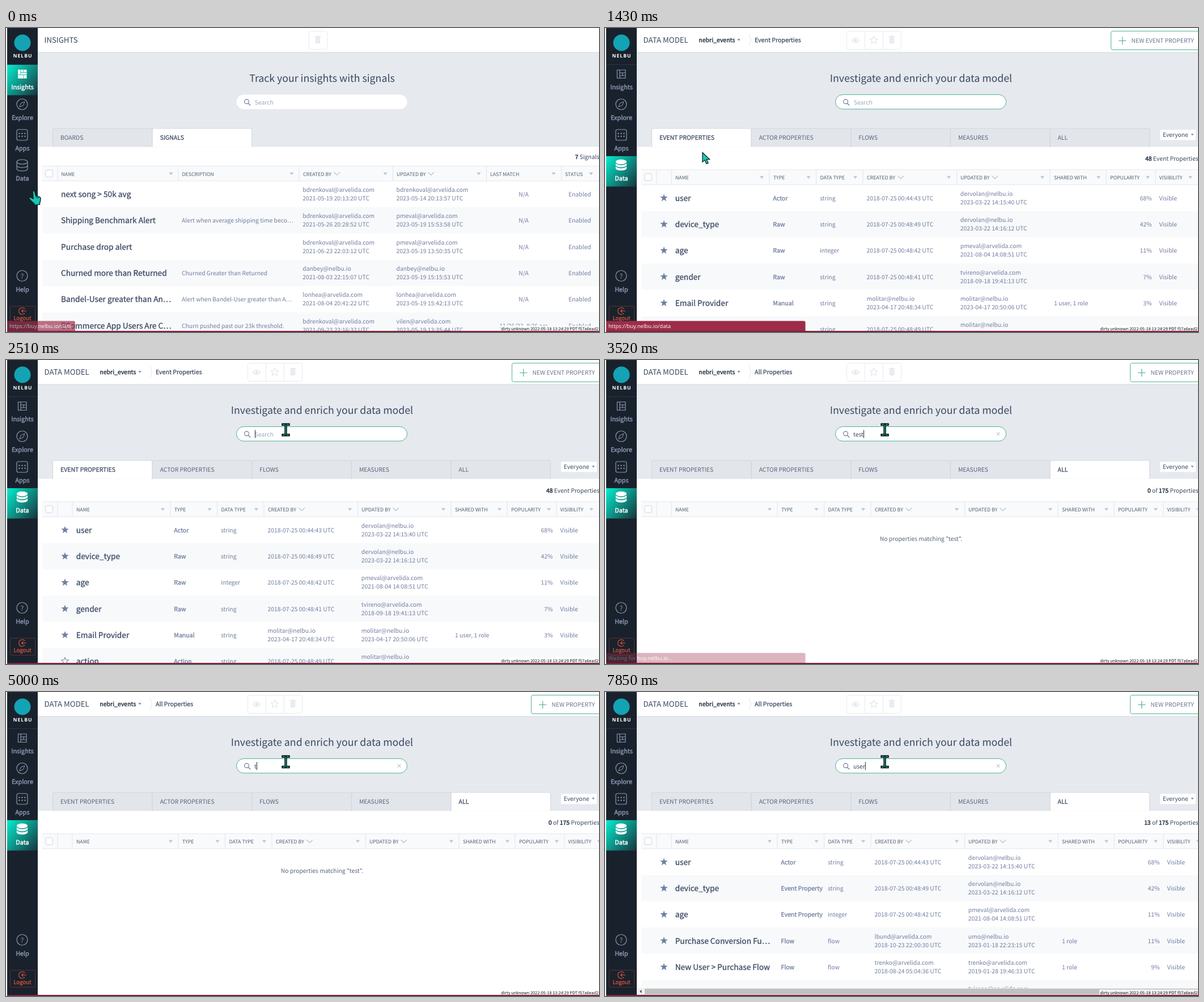
An HTML page that plays this animation: 1046x536 px, repeating every 8 s.

```html
<!DOCTYPE html>
<html lang="en">
<head>
<meta charset="utf-8">
<title>Data model search</title>
<style>
  html, body { margin: 0; width: 100%; height: 100%; overflow: hidden; background: #fff; }
  svg { display: block; width: 1046px; height: 536px; }
  text { font-family: "Noto Sans CJK JP", "Noto Sans CJK SC", "Noto Sans CJK", "Open Sans", sans-serif; white-space: pre; text-rendering: geometricPrecision; }
  .plain { font-family: "Open Sans", "Noto Sans", sans-serif; }
</style>
</head>
<body>
<svg id="stage" viewBox="0 0 1046 536" xmlns="http://www.w3.org/2000/svg"></svg>
<script>
const LOOP = 8000, BODY = 11.55, ROW = 46.3;
const INK = '#3a4862', DARK = '#212d40', SLATE = '#707d9f', NAVY = '#19222c', GREEN = '#4fb096', MUTED = '#8996b1';
const CORP = '@arvelida.com', IO = '@nelbu.io';

// ---- drawing helpers ----
const rect = (x, y, w, h, fill, extra = '') => `<rect x="${x}" y="${y}" width="${w}" height="${h}" fill="${fill}" ${extra}/>`;
const line = (d, color, w = 1, fill = 'none') => `<path d="${d}" fill="${fill}" stroke="${color}" stroke-width="${w}"/>`;
const fillPath = (d, color) => `<path d="${d}" fill="${color}"/>`;
const circle = (x, y, r, fill, extra = '') => `<circle cx="${x}" cy="${y}" r="${r}" fill="${fill}" ${extra}/>`;
// Sizes follow a narrower cut of the same letterforms, hence the ratio.
const fontSize = size => (size / 1.117).toFixed(2);
function text(x, y, s, { size = BODY, fill = SLATE, heavy = 0, anchor = 'start' } = {}) {
  const stroke = heavy ? `stroke="${fill}" stroke-width="${heavy}"` : '';
  return `<text x="${x}" y="${y}" font-size="${fontSize(size)}" fill="${fill}" text-anchor="${anchor}" ${stroke}>${s}</text>`;
}
const group = (id, content) => `<g id="${id}">${content}</g>`;
const caretDown = (x, y, w, color) => fillPath(`M${x - w} ${y - w * .65}h${2 * w}l${-w} ${w * 1.3}z`, color);

function star(x, y, r, filled, color) {
  const points = Array.from({ length: 10 }, (_, i) => {
    const a = -Math.PI / 2 + i * Math.PI / 5, k = i % 2 ? r * .42 : r;
    return (x + k * Math.cos(a)).toFixed(1) + ',' + (y + k * Math.sin(a)).toFixed(1);
  });
  return `<polygon points="${points.join(' ')}" fill="${filled ? color : 'none'}" stroke="${color}" stroke-width="${filled ? 0 : 1}"/>`;
}

function trash(x) {
  return rect(x - 4, 17.5, 8, 9.5, '#e0e4eb', 'rx="1"') + rect(x - 5.5, 15, 11, 1.6, '#e0e4eb') +
    rect(x - 2, 13.6, 4, 1.5, '#e0e4eb') + line(`M${x - 1.5} 19v6.5m3-6.5v6.5`, '#fff');
}

// ---- sidebar ----
function navItem(top, label, lit, active) {
  const color = lit ? '#fff' : MUTED;
  return (active ? rect(2, top, 54, 53.5, 'url(#glow)') : '') +
    text(29, top + 43, label, { size: 12.1, fill: color, heavy: .45, anchor: 'middle' });
}
function insights(active) {
  return navItem(65, 'Insights', active, active) + (active
    ? rect(21, 73.5, 15.5, 15.5, '#fff') + line('M26 73.5v9m0-4h10.5M21 82.5h15.5M31 82.5v6.5M31 73.5v5', '#12b3a0', .9)
    : line('M21.5 74h14.5v14.5h-14.5zM26 74v14.5M26 79h10M26 84h10M31 79v5', MUTED, 1.2));
}
function data(lit, active) {
  const disc = y => `M19 ${y}c0 5.4 19 5.4 19 0`;
  return navItem(226, 'Data', lit, active) + (lit
    ? `<ellipse cx="28.5" cy="236" rx="9.7" ry="4.2" fill="#fff"/>` +
      [238.2, 243.8].map(y => fillPath(`M18.8 ${y}c2 4.6 17.4 4.6 19.4 0v3.6c-1 5-18.4 5-19.4 0z`, '#fff')).join('')
    : `<ellipse cx="28.5" cy="236" rx="9.5" ry="4" fill="none" stroke="${MUTED}" stroke-width="1.2"/>` +
      line(`M19 236v12M38 236v12${disc(242)}${disc(248)}`, MUTED, 1.2));
}
function sidebar() {
  const ring = `stroke="${MUTED}" stroke-width="1.2"`;
  const dots = [23.5, 28.5, 33.5].flatMap(x => [186, 191].map(y => circle(x, y, 1.2, MUTED))).join('');
  return rect(2, 0, 54, 536, NAVY) + circle(29, 26, 14.5, '#14a3b4') +
    `<text class="plain" x="29.5" y="51.5" font-size="8.6" font-weight="700" fill="#fff" text-anchor="middle" letter-spacing="1">NELBU</text>` +
    line('M2 64.5h54', '#2b3641') +
    navItem(119, 'Explore') + circle(28.5, 134.5, 9.5, 'none', ring) + line('M33 130l-2.6 6.6-6.6 2.6 2.6-6.6z', MUTED) +
    navItem(172.5, 'Apps') + rect(19, 179, 19, 19, 'none', 'rx="3" ' + ring) + dots +
    navItem(422, 'Help') + circle(28.5, 437, 9.5, 'none', ring) +
    text(28.5, 441.5, '?', { size: 13, fill: MUTED, anchor: 'middle' }) +
    rect(7.5, 490.5, 44, 30, 'none', 'rx="2" stroke="#5b2f35"') +
    line('M33.5 495.5a6 6 0 1 0 0 7M36 499h-8.5m3-2.8l-3 2.8 3 2.8', '#e0563f', 1.1) +
    text(29, 514.5, 'Logout', { size: 10.6, fill: '#e0563f', heavy: .25, anchor: 'middle' }) +
    group('insightsOn', insights(true)) + group('insightsOff', insights(false)) +
    group('dataOff', data(false, false)) + group('dataHover', data(true, false)) + group('dataOn', data(true, true));
}

// ---- page pieces ----
function tabs(labels, active) {
  return labels.map((label, i) => {
    const x = 82.5 + i * 175.65, on = i === active;
    return line(`M${x} 209.5v-29.5q0-3 3-3h169.6q3 0 3 3v29.5`, '#d0d5de', 1, on ? '#fff' : '#e2e5ea') +
      text(x + 13.5, 197.3, label, { size: on ? 11.75 : 11.5, fill: on ? INK : '#56637c', heavy: on ? .25 : 0 });
  }).join('');
}
const heading = s => text(557.5, 95.2, s, { size: 19.8, fill: INK, anchor: 'middle' });
const pageTitle = s => text(67.5, 26.2, s, { size: 14.8, fill: INK });

function tableHead(top, dividers, columns, filters) {
  return rect(64, top, 982, 26.5, '#f9fafb') + line(`M64 ${top}h982M64 ${top + 26.5}h982`, '#e4e8ee') +
    rect(70, top + 7, 12.5, 12.5, '#fff', 'rx="3" stroke="#cdd5e1"') +
    line(dividers.map(x => `M${x} ${top}v26.5`).join(''), '#e1e5ec') +
    columns.map(([x, label]) => text(x, top + 17.3, label, { size: 9.8, fill: '#505d77' }) +
      (/BY$/.test(label) ? line(`M${x + (label[0] === 'C' ? 54.5 : 55.5)} ${top + 11}l5.2 5 5.2-5`, '#8a96ad') : '')).join('') +
    filters.map(x => caretDown(x, top + 13.7, 3.6, '#bcc4d2')).join('');
}
const band = (top, i) => i % 2 ? rect(64, top + i * ROW, 982, ROW, '#f8f9fb') : '';
const who = (x, y, [user, date]) => user ? text(x, y - 4, user) + text(x, y + 11, date + ' UTC') : text(x, y + 4, date + ' UTC');
const nameCell = (x, y, s) => text(x, y + 5, s, { size: 15.3, fill: INK, heavy: .3 });

function signalsPage() {
  const lead = 'bdrenkoval' + CORP, second = 'pmeval' + CORP, NA = 'N/A';
  const rows = [
    ['next song &gt; 50k avg', '', [lead, '2021-05-19 20:13:20'], [lead, '2023-05-14 20:13:57'], NA],
    ['Shipping Benchmark Alert', 'Alert when average shipping time beco…', [lead, '2021-05-26 20:28:52'], [second, '2023-05-19 15:53:58'], NA],
    ['Purchase drop alert', '', [lead, '2021-06-23 22:03:12'], [second, '2023-05-19 13:50:35'], NA],
    ['Churned more than Returned', 'Churned Greater than Returned', ['danbey' + IO, '2021-08-03 22:15:07'], ['danbey' + IO, '2023-05-19 15:15:53'], NA],
    ['Bandel-User greater than An…', 'Alert when Bandel-User greater than A…', ['lonhea' + CORP, '2021-08-04 20:41:22'], ['lonhea' + CORP, '2023-05-19 15:42:13'], NA],
    ['ECommerce App Users Are C…', 'Churn pushed past our 23k threshold.', [lead, '2021-09-23 22:16:32'], ['vilen' + CORP, '2023-05-19 13:35:44'], '11/26/22, 8:26 am'],
  ];
  const body = rows.map(([name, about, created, updated, match], i) => {
    const y = 293 + i * ROW;
    return band(269.8, i) + nameCell(97, y, name) + text(310, y + 4, about) + who(523.3, y, created) + who(688.5, y, updated) +
      text(913, y + 4, match, { anchor: 'middle' }) + text(1012, y + 4, 'Enabled', { anchor: 'middle' });
  }).join('');
  return pageTitle('INSIGHTS') + rect(534.5, 5.5, 32, 32, '#fff', 'rx="3" stroke="#e8ebf1"') + trash(550) +
    heading('Track your insights with signals') + tabs(['BOARDS', 'SIGNALS'], 1) +
    tableHead(243.3, [91, 304, 517, 682.5, 847.5, 979.5],
      [[97.5, 'NAME'], [310.5, 'DESCRIPTION'], [524, 'CREATED BY'], [689, 'UPDATED BY'], [854, 'LAST MATCH'], [986, 'STATUS']],
      [291, 504, 669, 834, 966, 1032]) + body;
}

function dataChrome() {
  return pageTitle('DATA MODEL') + text(165.3, 24.8, 'nebri_events', { size: 11.8, fill: DARK, heavy: .35 }) +
    caretDown(236, 21, 2.6, '#7b88a2') + line('M254 10l3.5 11-3.5 11', '#e3e7ee') +
    rect(426.5, 5.5, 96, 32, '#fff', 'rx="3" stroke="#e8ebf1"') + line('M458.5 5.5v32m32-32v32', '#e8ebf1') +
    line('M435.5 21.5q6.5-8 13 0q-6.5 8-13 0z', '#dde2ea', 1.2) + circle(442, 21.5, 2.2, '#dde2ea') +
    star(474, 21.5, 7.5, false, '#dde2ea') + trash(506) +
    heading('Investigate and enrich your data model') +
    rect(979, 179.5, 63, 18, '#fff', 'rx="1"') + text(983.8, 192, 'Everyone', { fill: INK }) + caretDown(1036, 188.2, 2.5, '#7b88a2');
}

function newButton(x, label) {
  return rect(x, 5.5, 170, 33, '#fff', `rx="3" stroke="${GREEN}"`) + line(`M${x + 13.5} 22.5h13.5m-6.75-6.75v13.5`, GREEN, 1.2) +
    text(x + 36, 26, label, { fill: '#65748f' });
}
function propertyHead(shift, all) {
  const cols = [[297, 'TYPE'], [379.5, 'DATA TYPE'], [462, 'CREATED BY'], [627, 'UPDATED BY'], [792, 'SHARED WITH'], [891, 'POPULARITY'], [977.5, 'VISIBILITY']];
  return text(264, 24.8, all ? 'All Properties' : 'Event Properties', { size: 11.83, fill: INK, heavy: .25 }) +
    newButton(all ? 926.5 : 892.5, all ? 'NEW PROPERTY' : 'NEW EVENT PROPERTY') +
    tabs(['EVENT PROPERTIES', 'ACTOR PROPERTIES', 'FLOWS', 'MEASURES', 'ALL'], all ? 4 : 0) +
    tableHead(249.8, [91, 117, ...[290, 372.5, 455, 620.5, 785, 884, 971].map(x => x + shift)],
      [[124, 'NAME'], ...cols.map(([x, s]) => [x + shift, s])],
      [276.5, 359, 441.5, 606.5, 771.5, 870.5, 957.5, 1032.5].map(x => x + shift));
}
function propertyRows(shift, rows) {
  return rows.map(([name, type, kind, created, updated, shared, share], i) => {
    const y = 299.7 + i * ROW;
    return band(276.5, i) + star(104, y, 7, i < 5, '#7080a3') + nameCell(123.7, y, name) +
      text(296.3 + shift, y + 4, type, { size: 11.83, heavy: .3 }) + text(379 + shift, y + 4, kind) +
      who(461.5 + shift, y, created) + who(626.8 + shift, y, updated) + text(792 + shift, y + 4, shared) +
      text(964.5 + shift, y + 4, share, { anchor: 'end' }) + text(977.5 + shift, y + 4, 'Visible');
  }).join('');
}
const firstRows = type => [
  ['user', 'Actor', 'string', ['', '2018-07-25 00:44:43'], ['dervolan' + IO, '2023-03-22 14:15:40'], '', '68%'],
  ['device_type', type, 'string', ['', '2018-07-25 00:48:49'], ['dervolan' + IO, '2023-03-22 14:16:12'], '', '42%'],
  ['age', type, 'integer', ['', '2018-07-25 00:48:42'], ['pmeval' + CORP, '2021-08-04 14:08:51'], '', '11%'],
];
const eventRows = [...firstRows('Raw'),
  ['gender', 'Raw', 'string', ['', '2018-07-25 00:48:41'], ['tvireno' + CORP, '2018-09-18 19:41:13'], '', '7%'],
  ['Email Provider', 'Manual', 'string', ['molitar' + IO, '2023-04-17 20:48:34'], ['molitar' + IO, '2023-04-17 20:50:06'], '1 user, 1 role', '3%'],
  ['action', 'Action', 'string', ['', '2018-07-25 00:48:49'], ['molitar' + IO, '2023-04-17 20:52:10'], '', ''],
];
const allRows = [...firstRows('Event Property'),
  ['Purchase Conversion Fu…', 'Flow', 'flow', ['lbund' + CORP, '2018-10-23 22:00:30'], ['umo' + IO, '2023-01-18 22:23:15'], '1 role', '11%'],
  ['New User &gt; Purchase Flow', 'Flow', 'flow', ['trenko' + CORP, '2018-08-24 05:04:36'], ['trenko' + CORP, '2019-01-28 19:46:33'], '1 role', '9%'],
  ['', '', '', ['', ''], ['tvireno' + CORP, ''], '', ''],
];
const scrollbar = rect(56, 522, 990, 12, '#f1f1f1') + rect(70, 523, 976, 10, '#c1c1c1') + fillPath('M64.5 525v6l-3.5-3z', '#555');

// ---- cursors, hot spot at 0,0 ----
const EDGE = '#0a2024', TEAL = '#17c8b2';
const hand = line('M0 1.3q1.6-2.6 3.6 0L5.6 9l6 1.7q2.8 1 2.4 4.3-.2 4-1.6 6.5l.3 2.5-9 1.5-.8-2.6Q-2.4 19-6.4 13.5q-.4-2.6 2.2-2.2L1.2 14z', EDGE, 1.4, TEAL) +
  line('M5.9 9.5l.8 4m2.3-3l.6 3.5', EDGE, .9);
const arrow = line('M.5 .5v17l4-3.6 3 6.6 3.2-1.4-3-6.5h5.5z', EDGE, 1.2, TEAL);
const beam = line('M-7.2-9.2h14.4M-7.2 9.2h14.4M0-9v18', '#050c0e', 4.4) +
  line('M-5.5-9.2h4M1.5-9.2h4M0-9v18M-5.5 9.2h4M1.5 9.2h4', '#1cae9c', 1.4);

document.getElementById('stage').innerHTML =
  `<defs><linearGradient id="glow" x1="0" y1=".1" x2="1" y2=".9"><stop offset="0" stop-color="#04e6c8"/><stop offset="1" stop-color="#173b43"/></linearGradient></defs>` +
  rect(0, 0, 1046, 536, '#fff') + rect(56, 42.5, 990, 167, '#e6e9ee') + rect(56, 42.5, 990, 1.5, '#dee2e8') +
  group('signals', signalsPage()) +
  group('model', dataChrome()) +
  group('eventTab', propertyHead(0, false) + propertyRows(0, eventRows)) +
  group('allTab', propertyHead(14, true)) +
  group('allRows', propertyRows(14, allRows) + scrollbar) +
  group('empty', text(557.5, 319, 'No properties matching "test".', { fill: '#56637c', anchor: 'middle' })) +
  `<rect id="pill" x="406.5" y="117.5" width="301" height="25.5" rx="12.75" fill="#fff"/>` +
  circle(424.5, 129.8, 3.9, 'none', `stroke="${SLATE}" stroke-width="1.2"`) + line('M427.4 132.7l3.8 3.8', SLATE, 1.3) +
  group('hint', text(438.8, 134.6, 'Search', { fill: '#9ba8bf' })) +
  `<text id="query" x="438" y="134.6" font-size="${fontSize(BODY)}" fill="${INK}"></text>` +
  `<rect id="caret" y="123.5" width="1" height="14" fill="#1d2733"/>` +
  group('clear', line('M690.8 127.5l5.6 5.6m0-5.6l-5.6 5.6', '#9aa6bb')) +
  `<text id="count" x="1046.5" font-size="${fontSize(BODY)}" fill="${INK}" text-anchor="end"></text>` +
  sidebar() +
  rect(872, 524.5, 174, 10, '#fff', 'opacity=".8"') + text(873.5, 532.5, 'dirty unknown 2022-05-18 13:24:29 PDT f57a6ead2', { size: 8.2, fill: '#111' }) +
  group('bubble', `<path id="bubbleBox" fill="#9c2d48"/><text id="bubbleText" class="plain" x="6" y="529.3" font-size="9.5" fill="#fff"></text>`) +
  rect(2, 534, 1044, 2, '#7c2040') +
  group('cursor', group('hand', hand) + group('arrow', arrow) + group('beam', beam));

// ---- timeline ----
const $ = id => document.getElementById(id);
const show = (id, on) => $(id).setAttribute('display', on ? 'inline' : 'none');
function put(id, html) {
  const el = $(id);
  if (el.shown !== html) { el.innerHTML = html; el.shown = html; }
}
const latest = (keys, t) => keys.filter(k => k[0] <= t).pop();
const ramp = (t, a, b) => Math.min(1, Math.max(0, (t - a) / (b - a)));

const OPEN = 1300, ALL = 3520, RESULTS = 5180;
const typing = [[2470, ''], [2960, 't'], [3040, 'te'], [3240, 'tes'], [3320, 'test'], [4650, 'tes'], [4850, 'te'], [5000, 't'], [5400, ''],
  [7390, 'u'], [7470, 'us'], [7540, 'use'], [7620, 'user']];
const counts = [[0, '7', '', 'Signals'], [OPEN, '', '48', 'Event Properties'], [2960, '21', '48', 'Event Properties'], [ALL, '0', '175', 'Properties'],
  [RESULTS, '98', '175', 'Properties'], [5400, '', '175', 'Properties'], [7390, '98', '175', 'Properties'], [7850, '13', '175', 'Properties']];
const track = [[0, 47, 287], [360, 47, 287], [720, 28, 258], [1200, 28, 258], [1800, 462, 140], [1970, 483, 132], [2270, 494, 128],
  [2450, 494, 127], [2510, 493.5, 123], [LOOP, 493.5, 123]];

function cursorAt(t) {
  const i = track.findIndex(k => k[0] > t), a = track[i - 1], b = track[i];
  const u = ramp(t, a[0], b[0]), e = u * u * (3 - 2 * u);
  return [a[1] + (b[1] - a[1]) * e, a[2] + (b[2] - a[2]) * e];
}
function bubbleAlpha(t) {
  if (t < 40) return t < 20 ? .68 : .3;
  if (t < 3000) return ramp(t, 560, 740) * (1 - ramp(t, 2100, 2270));
  return ramp(t, 3500, 3560) * (1 - .22 * (t >= 3840) - .78 * ramp(t, 3840, 4070));
}

function render(t) {
  const model = t >= OPEN, all = t >= ALL;
  show('signals', !model); show('model', model);
  show('eventTab', model && !all); show('allTab', all);
  show('empty', all && t < RESULTS); show('allRows', t >= RESULTS);
  $('pill').setAttribute('stroke', model ? GREEN : 'none');

  const [x, y] = cursorAt(t);
  const overData = x < 56 && y < 280;
  const overField = x > 407 && x < 708 && y > 118 && y < 143;
  $('cursor').setAttribute('transform', `translate(${x.toFixed(2)} ${y.toFixed(2)})`);
  show('hand', t < 30 || overData);
  show('beam', overField);
  show('arrow', t >= 30 && !overData && !overField);

  show('insightsOn', !model); show('insightsOff', model);
  show('dataOn', model); show('dataHover', !model && overData); show('dataOff', !model && !overData);

  const [since, query] = latest(typing, t) || [Infinity, ''];
  put('query', query);
  show('hint', !query); show('clear', query);
  show('caret', t >= since && Math.floor((t - since) / 525) % 2 === 0);
  $('caret').setAttribute('x', query ? 438 + $('query').getComputedTextLength() : 439);

  const [, found, total, noun] = latest(counts, t);
  const strong = s => `<tspan fill="${DARK}" stroke="${DARK}" stroke-width=".45">${s}</tspan>`;
  put('count', [found, total].filter(Boolean).map(strong).join(' of ') + ' ' + noun);
  $('count').setAttribute('y', model ? 234.3 : 231);

  $('bubble').setAttribute('opacity', bubbleAlpha(t).toFixed(3));
  $('bubbleBox').setAttribute('d', `M2 516.5h${t < 920 ? 117 : 348.5}q3 0 3 3v14.5H2z`);
  put('bubbleText', t < 3000 ? 'https://buy.nelbu.io/data' : 'Waiting for buy.nelbu.io...');
}

const start = performance.now();
function tick() {
  render((performance.now() - start) % LOOP);
  requestAnimationFrame(tick);
}
tick();
</script>
</body>
</html>
```
